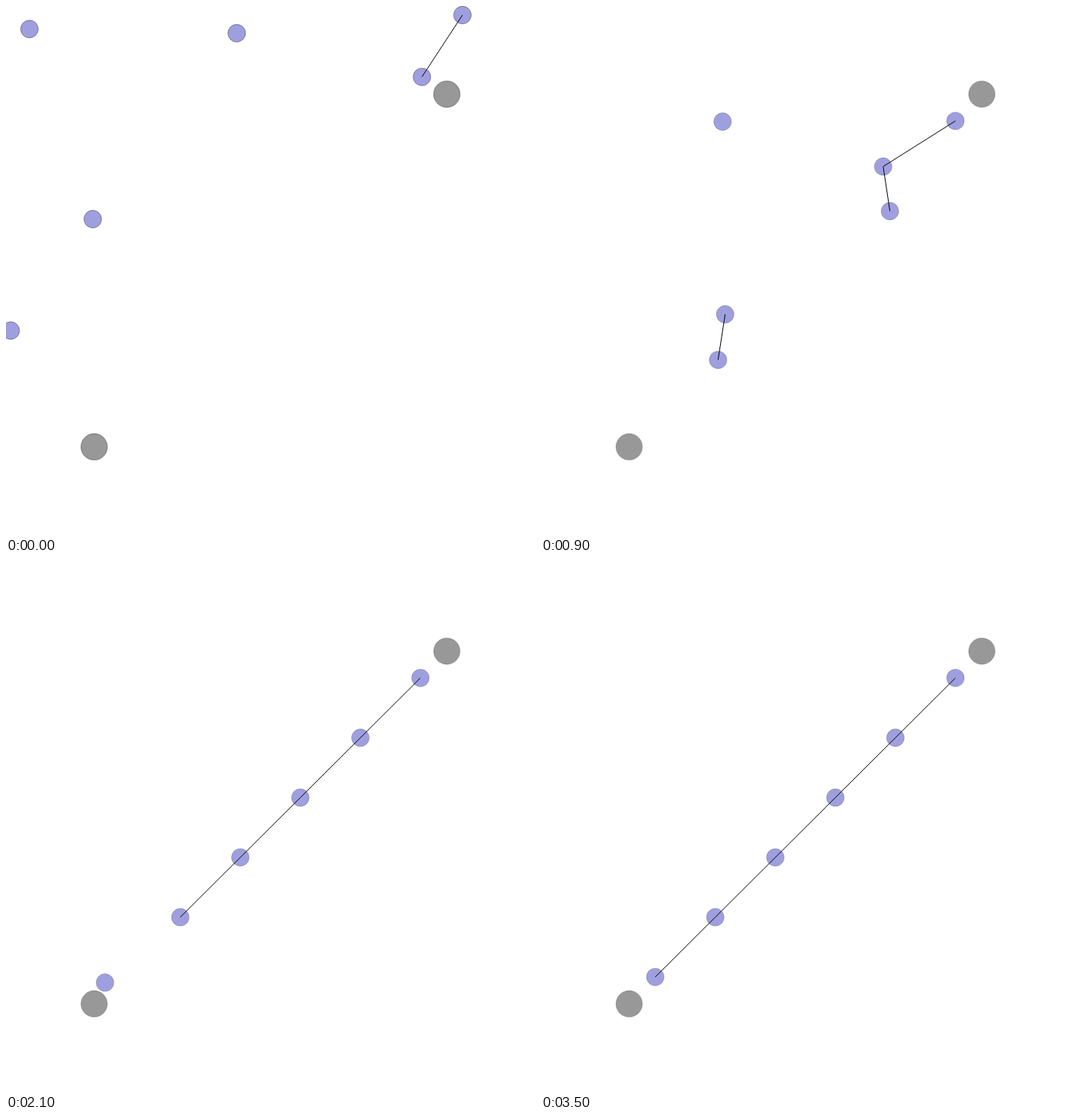
An HTML page with a canvas for the animation above (6600 ms loop, 700 by 700 pixels).

```html
<!DOCTYPE html>
<html lang="en">
<head>
<meta charset="utf-8">
<title>Agents forming a line</title>
<style>
html, body { margin: 0; width: 100%; height: 100%; overflow: hidden; background: #fff; }
canvas { display: block; }
</style>
</head>
<body>
<canvas id="stage" width="700" height="700"></canvas>
<script>
const ctx = document.getElementById('stage').getContext('2d');
const LOOP = 6600, STEP = 100, END = 3500, UNIT = 700 / 6;
const landmarks = [[UNIT, 5 * UNIT], [5 * UNIT, UNIT]];

// Start and turning points of each agent, in the order of their slots on the line.
const paths = [
  [[550.4, 93.8], [546.3, 128.5]],
  [[305.3, 36], [379.7, 111.2], [452.8, 212.4], [472.7, 233.3]],
  [[31, 30.5], [130.2, 75.3], [240.3, 153], [338.2, 245.7], [405.7, 312]],
  [[114.8, 282], [170.3, 376.5], [243.7, 408], [306, 392]],
  [[6.2, 429.5], [120, 419.3], [234.3, 468.3]],
  [[604, 12], [553, 153.2], [461.7, 271.5], [361.3, 407.2], [209.6, 510.5], [131, 555.2]]
].map((path, i) => [...path, [548.4 - 79.44 * i, 152.1 + 79.15 * i]]);

const keyTime = i => i ? 100 + 400 * i : 0;
const point = (path, i) => path[Math.min(i, path.length - 1)];
const slope = (path, i, k) =>
  (point(path, i + 1)[k] - point(path, i)[k]) / (keyTime(i + 1) - keyTime(i));

// Velocity at a point, limited so that the path never overshoots it.
function velocity(path, i, k) {
  if (i === 0) return 0.3 * slope(path, 0, k);
  const a = slope(path, i - 1, k), b = slope(path, i, k);
  if (a * b <= 0) return 0;
  return Math.sign(a) * Math.min(Math.abs(a + b) / 2, 3 * Math.abs(a), 3 * Math.abs(b));
}

function position(path, t) {
  const i = Math.max(0, Math.floor((t - 100) / 400));
  const span = keyTime(i + 1) - keyTime(i), u = (t - keyTime(i)) / span, w = 1 - u;
  return [0, 1].map(k =>
    point(path, i)[k] * w * w * (1 + 2 * u) +
    point(path, i + 1)[k] * u * u * (3 - 2 * u) +
    span * u * w * (w * velocity(path, i, k) - u * velocity(path, i + 1, k)));
}

function disc([x, y], r, rgb, edge) {
  ctx.beginPath();
  ctx.arc(x, y, r, 0, 2 * Math.PI);
  ctx.fillStyle = `rgba(${rgb},.5)`;
  ctx.fill();
  ctx.strokeStyle = `rgba(0,0,0,${edge})`;
  ctx.stroke();
}

function draw(t) {
  const edge = t ? 0.18 : 0.35; // outlines are bolder before the agents set off
  ctx.clearRect(0, 0, 700, 700);
  const agents = paths.map(path => position(path, t));
  for (const p of agents) disc(p, 0.1 * UNIT, '64,64,191', edge);
  for (const p of landmarks) disc(p, 0.15 * UNIT, '51,51,51', edge);

  // Agents closer than one unit are linked.
  ctx.strokeStyle = '#000';
  ctx.beginPath();
  agents.forEach(([x, y], i) => {
    for (const [px, py] of agents.slice(i + 1)) {
      if (Math.hypot(px - x, py - y) < UNIT) {
        ctx.moveTo(x, y);
        ctx.lineTo(px, py);
      }
    }
  });
  ctx.stroke();
}

const start = performance.now();
function tick() {
  const t = (performance.now() - start) % LOOP;
  draw(Math.min(Math.floor(t / STEP) * STEP, END));
  requestAnimationFrame(tick);
}
tick();
</script>
</body>
</html>
```
